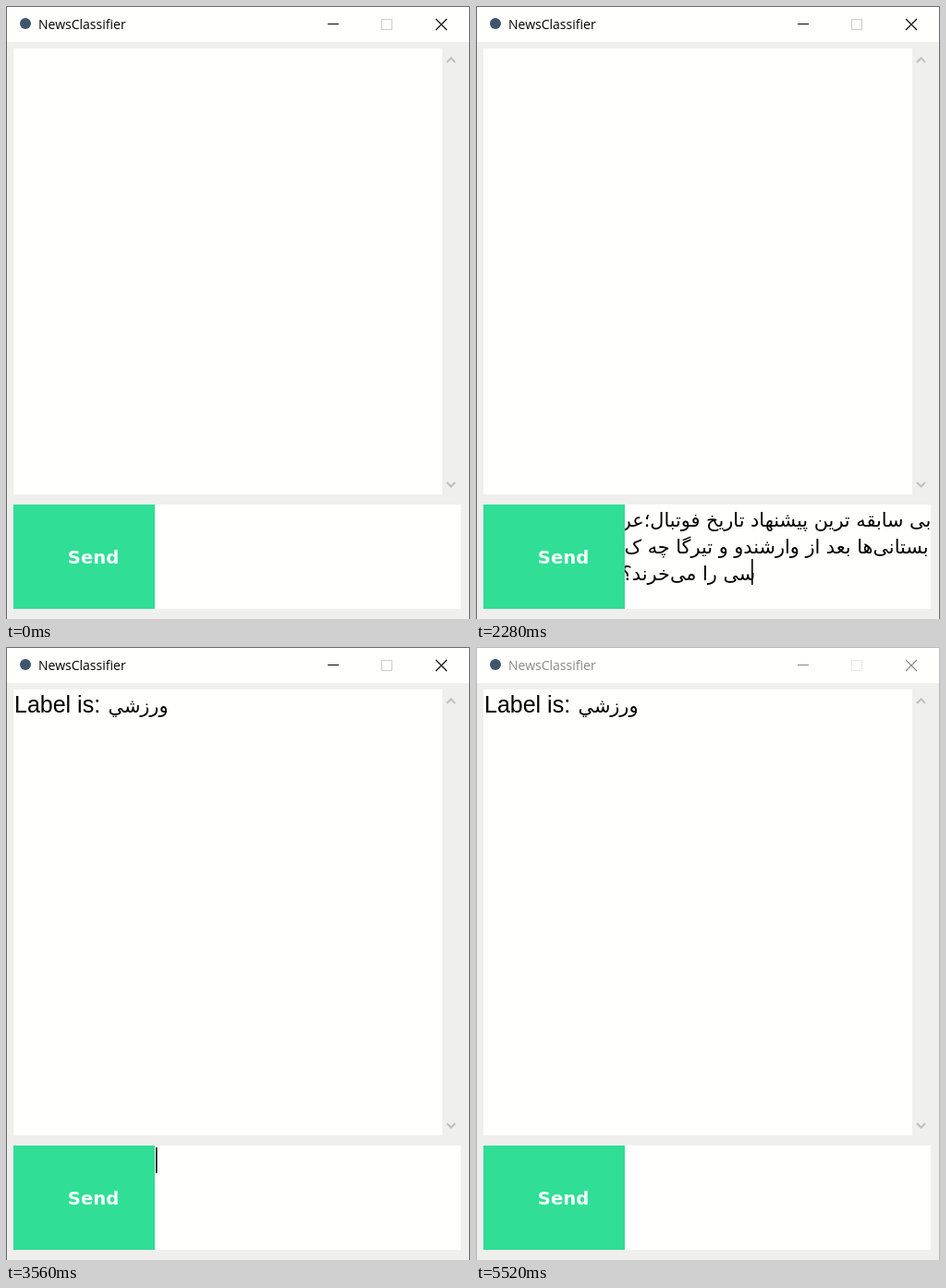
These frames come from a looping animation (502 by 664 pixels, 5600 ms). An HTML page:

```html
<!DOCTYPE html>
<html lang="en">
<head>
<meta charset="utf-8">
<title>NewsClassifier</title>
<style>
  html, body { margin: 0; width: 100%; height: 100%; overflow: hidden; background: #eff0ed; }
  svg { display: block; width: 502px; height: 664px; }

  .frame, .caret, .pasted, .result, .button, .face {
    animation: 5600ms step-end infinite;
  }
  .title { font: 14px "Open Sans", "Noto Sans", sans-serif; }
  .latin { font: 25px "Liberation Sans", Arial, sans-serif; }
  .persian { font: 20.8px "DejaVu Sans", sans-serif; direction: rtl; text-anchor: middle; }
  .button { font: bold 19.6px "DejaVu Sans", Verdana, sans-serif; text-anchor: middle; }

  .frame { animation-name: deactivate; }
  .caret { animation-name: blink, jump; }
  .pasted { animation-name: paste; }
  .result { animation-name: answer; }
  .face { animation-name: press; }
  .button { animation-name: press-label; }

  @keyframes deactivate {
    0% { color: #000; }
    98.57%, 100% { color: #888; }
  }
  @keyframes blink {
    0% { opacity: 0; }
    3.57% { opacity: 1; }
    13.57% { opacity: 0; }
    19.28% { opacity: 1; }
    34.99% { opacity: 0; }
    39.99% { opacity: 1; }
    50.71% { opacity: 0; }
    55.71% { opacity: 1; }
    65.71% { opacity: 0; }
    71.42% { opacity: 1; }
    81.42% { opacity: 0; }
    87.14% { opacity: 1; }
    97.14%, 100% { opacity: 0; }
  }
  @keyframes jump {
    0% { transform: none; }
    24.28% { transform: translate(136px, 57px); }
    62.85%, 100% { transform: none; }
  }
  @keyframes paste {
    0% { opacity: 0; }
    24.28% { opacity: 1; }
    62.85%, 100% { opacity: 0; }
  }
  @keyframes answer {
    0% { opacity: 0; }
    62.85%, 100% { opacity: 1; }
  }
  @keyframes press {
    0% { fill: #30de96; }
    58.57% { fill: #3c9d9b; }
    62.85%, 100% { fill: #30de96; }
  }
  @keyframes press-label {
    0% { fill: #f4fff9; transform: none; }
    58.57% { fill: #080c0c; transform: translate(1px, 1px); }
    62.85%, 100% { fill: #f4fff9; transform: none; }
  }
</style>
</head>
<body>
<svg viewBox="0 0 502 664">
  <rect width="502" height="664" fill="#eff0ed"/>
  <rect width="502" height="39" fill="#fffffe"/>

  <!-- title bar and window border -->
  <g class="frame" fill="none" stroke="currentColor">
    <path d="M.5 664V.5H501.5V664" stroke-opacity=".58"/>
    <path d="M348 19.5h12"/>
    <rect x="406.5" y="14.5" width="11" height="11" stroke-opacity=".2"/>
    <path d="M465 14l12 12M477 14l-12 12" stroke-width="1.1"/>
    <text class="title" x="35" y="25" fill="currentColor" stroke="none">NewsClassifier</text>
  </g>
  <circle cx="21" cy="19" r="6" fill="#3f556b"/>

  <!-- message log -->
  <rect x="8" y="46" width="464" height="483" fill="#fffffd"/>
  <g fill="none" stroke="#bfc0bd" stroke-width="2">
    <path d="M477 61l4.5-4.5 4.5 4.5"/>
    <path d="M477 516l4.5 4.5 4.5-4.5"/>
  </g>
  <g class="result">
    <text class="latin" x="9" y="71">Label is:</text>
    <text class="persian" x="143" y="71">ورزشي</text>
  </g>

  <!-- input row -->
  <rect x="161" y="540" width="331" height="113" fill="#fffffd"/>
  <g class="pasted persian">
    <text x="325" y="564">بی سابقه ترین پیشنهاد تاریخ فوتبال؛عر</text>
    <text x="325" y="593">بستانی&zwnj;ها بعد از وارشندو و تیرگا چه ک</text>
    <text x="230" y="622">سی را می&zwnj;خرند؟</text>
  </g>
  <rect class="caret" x="162" y="542" width="1.6" height="28"/>
  <rect class="face" x="8" y="540" width="153" height="113"/>
  <text class="button" x="94.5" y="604">Send</text>
</svg>
</body>
</html>
```
